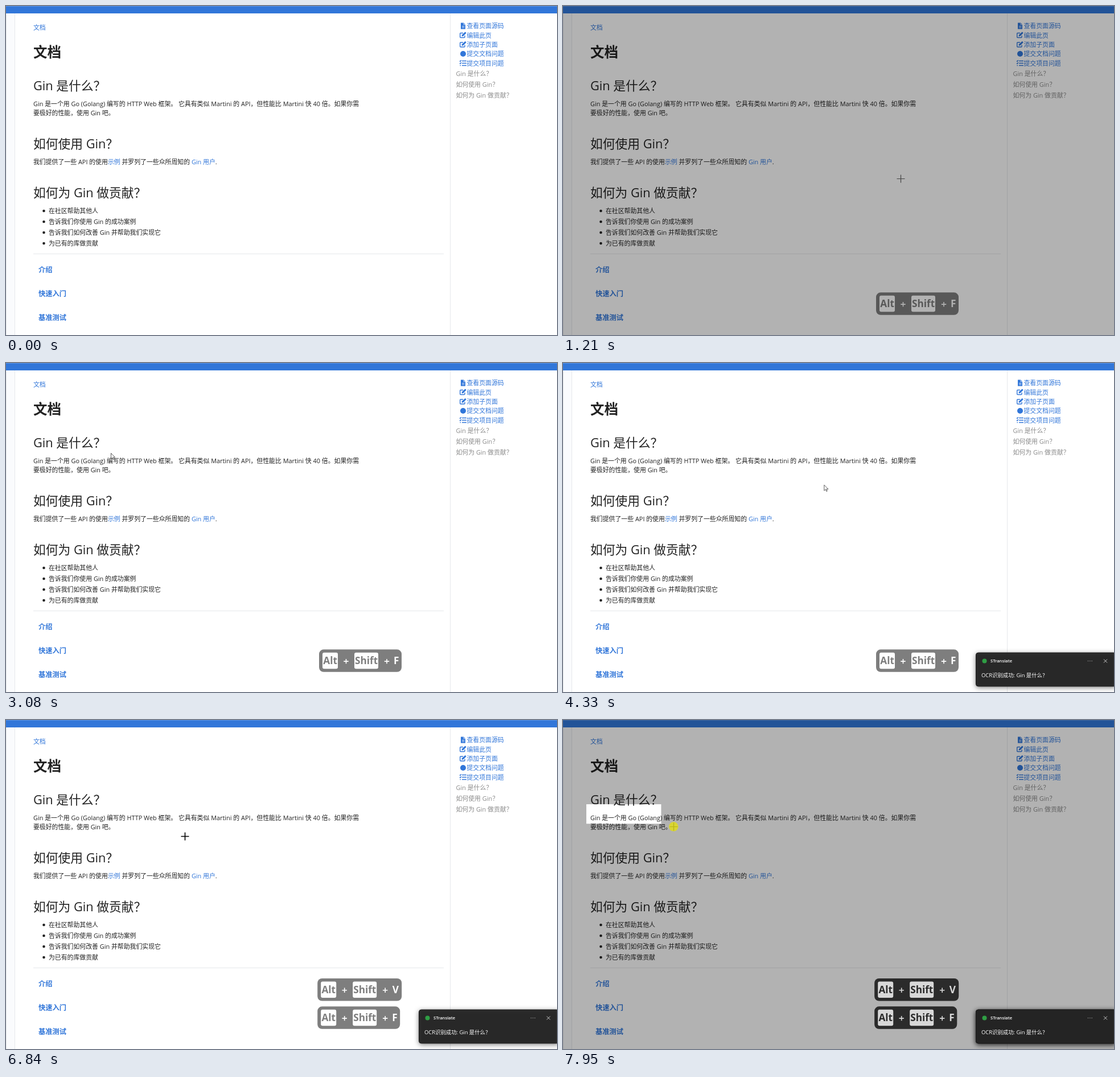
An HTML page that plays this animation: 968 px wide and 578 px high, repeating every 8000 ms.

```html
<!DOCTYPE html>
<html lang="zh-CN">
<head>
<meta charset="utf-8">
<title>Gin 文档</title>
<style>
  html, body { margin: 0; width: 100%; height: 100%; overflow: hidden; background: #fff; }
  svg { display: block; width: 968px; height: 578px; }
  text { font: 10.88px "Open Sans", "Noto Sans CJK SC", "Noto Sans CJK", sans-serif; fill: #222; white-space: pre; }
  .h1 { font-size: 24.48px; font-weight: 700; }
  .h2 { font-size: 21.76px; }
  .card { font-size: 12.24px; font-weight: 700; }
  .link, .card { fill: #3176d9; }
  .toc { fill: #8b8b8b; }
  .icon { fill: #3176d9; }
  .line { fill: none; stroke: #3176d9; stroke-width: 1.4; }
  .badge { opacity: .5; }
  .key { font-size: 17.2px; font-weight: 700; fill: #000; }
  .key.plain { fill: #fff; }
  #toast { filter: drop-shadow(0 2px 4px rgba(0, 0, 0, .5)); }
  #toast text { fill: #fff; font-size: 9.4px; }
  #toast .app { font-size: 7.6px; font-weight: 600; }
</style>
</head>
<body>
<svg viewBox="0 0 968 578">
  <defs>
    <g id="keys">
      <rect x="6" y="5.5" width="27" height="28.5" rx="3" fill="#fff"/>
      <rect x="62" y="5.5" width="42" height="28.5" rx="3" fill="#fff"/>
      <text class="key" x="7.3" y="26">Alt</text>
      <text class="key" x="63" y="26">Shift</text>
      <path d="M43.300 20.800h8.400M47.500 16.600v8.400M114.800 20.800h8.400M119 16.600v8.400" stroke="#fff" stroke-width="1.600"/>
    </g>
    <g id="edit">
      <path class="line" d="M6 2H1.700Q.7 2 .7 3V9Q.7 10 1.700 10H8Q9 10 9 9V6.500"/>
      <path class="icon" d="M3.500 7.800L4 5.300 9 .4Q9.700-.2 10.400.4L11.200 1.200Q11.800 1.900 11.200 2.500L6.200 7.400Z"/>
    </g>
  </defs>

  <rect width="968" height="578" fill="#fff"/>
  <rect width="15" height="578" fill="#fafbfd"/>
  <path d="M.5 13V578M15.500 13V578M780.500 13V578M48 435.500H769" stroke="#e6e8eb"/>
  <rect width="968" height="13" fill="#3176d9"/>
  <rect width="968" height="1" fill="#5b93e2"/>

  <text class="link" x="48" y="42">文档</text>
  <text class="h1" x="48" y="90">文档</text>
  <text class="h2" x="48" y="148">Gin 是什么？</text>
  <text x="48" y="175.500">Gin 是一个用 Go (Golang) 编写的 HTTP Web 框架。 它具有类似 Martini 的 API，但性能比 Martini 快 40 倍。如果你需</text>
  <text x="48" y="192">要极好的性能，使用 Gin 吧。</text>
  <text class="h2" x="48" y="250">如何使用 Gin？</text>
  <text x="48" y="277.500">我们提供了一些 API 的使用<tspan class="link">示例</tspan> 并罗列了一些众所周知的 <tspan class="link">Gin 用户</tspan>.</text>
  <text class="h2" x="48" y="336">如何为 Gin 做贡献？</text>
  <text x="75" y="363.500">在社区帮助其他人</text>
  <text x="75" y="382.500">告诉我们你使用 Gin 的成功案例</text>
  <text x="75" y="401.500">告诉我们如何改善 Gin 并帮助我们实现它</text>
  <text x="75" y="420.500">为已有的库做贡献</text>
  <path d="M66.500 360h0m0 19h0m0 19h0m0 19h0" stroke="#222" stroke-width="4.600" stroke-linecap="round"/>
  <text class="card" x="57" y="467.500">介绍</text>
  <text class="card" x="57" y="509.500">快速入门</text>
  <text class="card" x="57" y="551.500">基准测试</text>

  <path class="icon" d="M799 29.500H804L807 32.500V40.500H799Z"/>
  <path d="M801 35.500h4.500M801 37.800h4.500M804 30v2.700h3" stroke="#fff" stroke-width=".8" fill="none"/>
  <use href="#edit" x="797" y="45.500"/>
  <use href="#edit" x="797" y="62"/>
  <circle class="icon" cx="803" cy="84" r="5"/>
  <path class="line" d="M801 96.500h8M801 100.500h8M801 104.500h8M797 96.500l1 1 1.800-2.200M797 100.500l1 1 1.800-2.200M797.500 104.500h1.500"/>
  <text class="link" x="809.500" y="39">查看页面源码</text>
  <text class="link" x="809.500" y="55.500">编辑此页</text>
  <text class="link" x="809.500" y="72">添加子页面</text>
  <text class="link" x="809.500" y="88">提交文档问题</text>
  <text class="link" x="809.500" y="104.500">提交项目问题</text>
  <text class="toc" x="790.500" y="123">Gin 是什么？</text>
  <text class="toc" x="790.500" y="142">如何使用 Gin？</text>
  <text class="toc" x="790.500" y="161">如何为 Gin 做贡献？</text>

  <g id="clips">
    <rect x="470" y="217.500" width="203" height="203.500" fill="#000"/>
    <rect x="634" y="218.500" width="38.500" height="16.500" fill="#2d2d2d"/>
    <rect x="471" y="235" width="201.500" height="26.500" fill="#404040"/>
    <path d="M478.500 236v25" stroke="#8a8a8a"/>
    <text x="598" y="232" style="font-size:12.7px;fill:#808080">Ditto</text>
    <path d="M641.500 224l3 3-3 3M645 224l3 3-3 3M657.500 223l7 7M664.500 223l-7 7" fill="none" stroke="#777"/>
    <text x="473.500" y="242" style="font-size:4.500px;fill:#aaa">1</text>
    <text x="480" y="246" style="font-size:9px;fill:#fff">Gin 是什么？</text>
    <path d="M477.500 403.500h9.500v12h-9.500zM483.500 403.500v4h3.500" fill="none" stroke="#8a8a8a"/>
    <text x="497" y="413.500" style="fill:#8a8a8a">搜索</text>
    <path d="M655 409h0m5 0h0m5 0h0" stroke="#999" stroke-width="2.600" stroke-linecap="round"/>
  </g>

  <g id="hud">
    <g id="badgeF" class="badge">
      <rect width="145" height="39.500" rx="8"/>
      <use href="#keys"/>
      <text class="key plain" x="131" y="26">F</text>
    </g>
    <g id="badgeV" class="badge">
      <rect width="148" height="39.500" rx="8"/>
      <use href="#keys"/>
      <text class="key plain" x="131.500" y="26">V</text>
    </g>
    <g id="toast">
      <rect x="725.500" y="509" width="246" height="59" rx="4" fill="#262626" fill-opacity=".97" stroke="#1c1c1c"/>
      <circle cx="740.500" cy="523.500" r="4" fill="#2f9e44"/>
      <text class="app" x="751" y="526">STranslate</text>
      <path d="M922.500 523.500h0m3.300 0h0m3.300 0h0" stroke="#aaa" stroke-width="1.300" stroke-linecap="round"/>
      <path d="M950 520.500l6 6M956 520.500l-6 6" stroke="#ddd" stroke-width=".9"/>
      <text x="735" y="552">OCR识别成功: Gin 是什么？</text>
    </g>
  </g>
  <path id="dim" fill-rule="evenodd" fill-opacity=".3"/>
  <use id="liveHud" href="#hud"/>

  <g id="pointer">
    <path id="arrow" d="M.5.5V10.500L2.900 8.300 4.500 11.800 6 11.100 4.500 7.700H7.600Z" fill="#fff" stroke="#333" stroke-width=".8"/>
    <path id="cross" d="M-6.500.5h14M.5-6.500v14" fill="none"/>
    <circle id="press" cx=".3" cy=".3" r="8.300" fill="#eae400" fill-opacity=".7"/>
  </g>
</svg>
<script>
  const LOOP = 8000;
  const ENTRY = { x: 942, y: 567 };
  // Pointer moves: start, end, number of steps, destination
  const moves = [
    [290, 600, 5, 593, 303],
    [1440, 1670, 4, 290, 178],
    [1820, 2370, 8, 34, 118],
    [2530, 2920, 6, 184, 158],
    [3230, 3790, 9, 396, 195],
    [4190, 4400, 4, 469, 217],
    [5080, 5630, 8, 314, 204],
    [6980, 7530, 8, 40, 148],
    [7690, 7950, 4, 194, 187]
  ];
  const dims = [[1210, 3000], [6910, LOOP]];
  const drags = [[2530, 3000, 34, 118], [7690, LOOP, 41, 148]];
  const presses = [[2460, 3000], [4470, 4620], [5700, 5770], [7610, LOOP]];
  const crosses = [[1210, 3080], [6840, LOOP]];
  const LOWER_ROW = 503.3;
  const UPPER_ROW = 454;

  const el = id => document.getElementById(id);
  const within = (t, [from, to]) => t >= from && t < to;
  const show = (id, on) => el(id).setAttribute('display', on ? 'inline' : 'none');
  const place = (id, x, y) => el(id).setAttribute('transform', `translate(${x} ${y})`);
  const ease = p => (1 - Math.cos(Math.PI * p)) / 2;

  function stepped(t, start, end, count) {
    if (t < start) return 0;
    return Math.min(count, Math.floor((t - start + 5) / (end - start) * (count - 1)) + 1) / count;
  }

  function pointerAt(t) {
    let { x, y } = ENTRY;
    for (const [start, end, count, toX, toY] of moves) {
      const p = ease(stepped(t, start, end, count));
      x += (toX - x) * p;
      y += (toY - y) * p;
    }
    return { x, y };
  }

  function drawBadges(t) {
    show('badgeF', t >= 1060 && !within(t, [6230, 6770]));
    show('badgeV', t >= 4890);
    el('badgeF').style.opacity = within(t, [6160, 6230]) ? .25 : .5;
    const fOnTop = within(t, [4890, 6770]);
    place('badgeF', t < 4890 ? 550 : 547.2, fOnTop ? UPPER_ROW : LOWER_ROW);
    place('badgeV', 547.2, fOnTop ? LOWER_ROW : UPPER_ROW);
  }

  function drawDim(t) {
    const dim = dims.find(span => within(t, span));
    show('dim', dim);
    show('liveHud', dim && t >= dim[0] + 70);
    const drag = drags.find(span => within(t, span));
    let d = 'M0 0H968V578H0Z';
    if (drag) {
      // The selection trails the pointer by one step
      const [, , x, y] = drag;
      const end = pointerAt(t - 76);
      d += `M${x} ${y}H${Math.max(x, end.x + 1)}V${Math.max(y, end.y + 1)}H${x}Z`;
    }
    el('dim').setAttribute('d', d);
    return dim;
  }

  function drawPointer(t, dim) {
    const { x, y } = pointerAt(t);
    const cross = crosses.some(span => within(t, span));
    show('pointer', t >= 220);
    place('pointer', x, y);
    show('arrow', !cross);
    show('cross', cross);
    el('cross').setAttribute('stroke', dim ? '#444' : '#000');
    el('cross').setAttribute('stroke-width', dim ? 1.2 : 1.6);
    show('press', presses.some(span => within(t, span)));
  }

  function render(t) {
    drawBadges(t);
    const slide = 1 - stepped(t, 3230, 3560, 5);
    show('toast', t >= 3230);
    place('toast', 243 * slide ** 3, 0);
    show('clips', within(t, [4890, 5700]));
    drawPointer(t, drawDim(t));
  }

  const began = performance.now();
  function tick() {
    render((performance.now() - began) % LOOP);
    requestAnimationFrame(tick);
  }
  tick();
</script>
</body>
</html>
```
